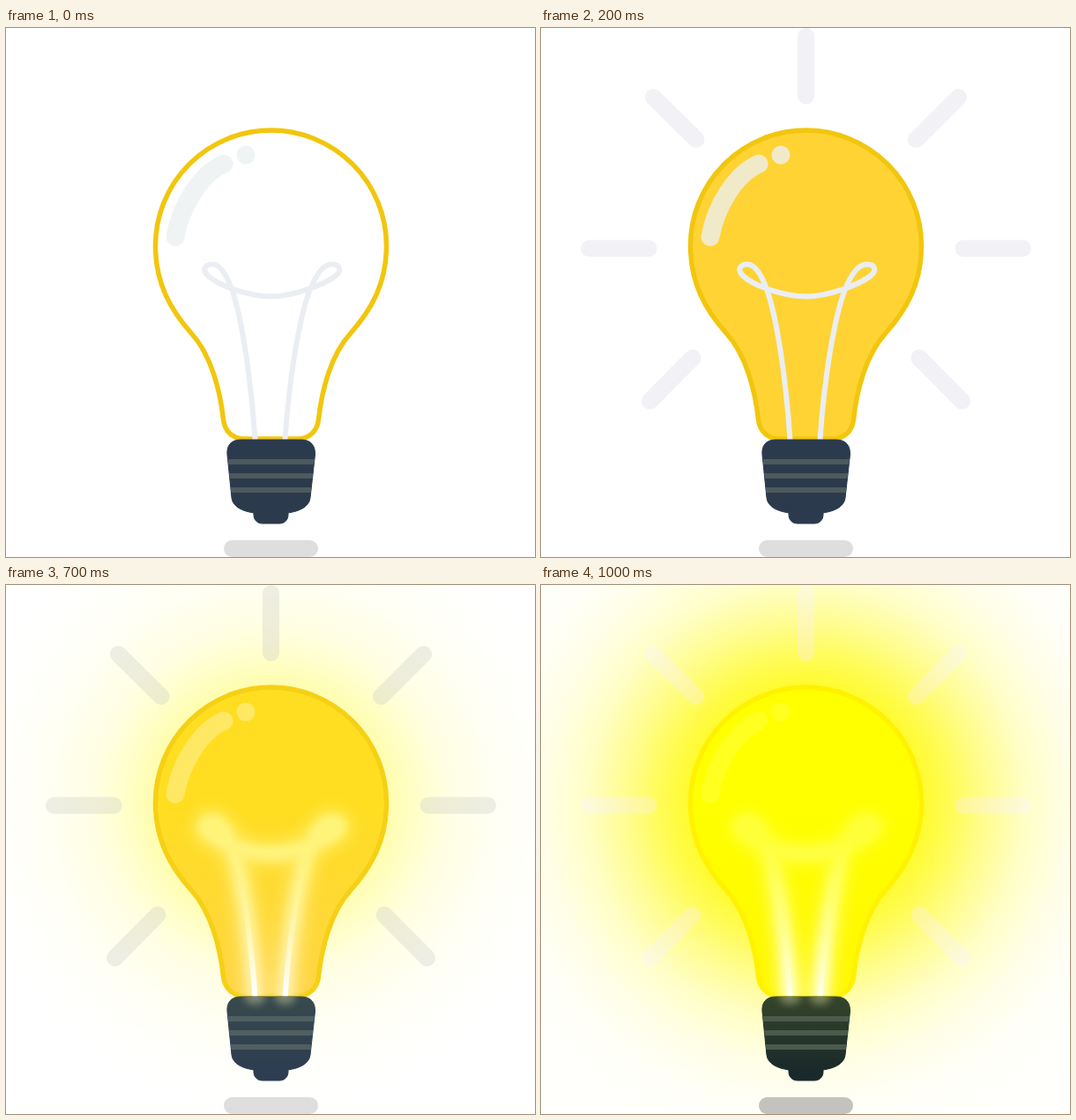
Write an HTML page that moves like this. It is 600 by 600 pixels and loops after 1.2 s.

```html
<!DOCTYPE html>
<html lang="en">
<head>
<meta charset="utf-8">
<title>Light bulb</title>
<style>
  html, body { margin: 0; width: 100%; height: 100%; overflow: hidden; background: #fff; }
  svg { display: block; width: 100%; height: 100%; }
  .line { fill: none; stroke-linecap: round; }
  #rays { stroke: url(#rayFill); stroke-width: 19; opacity: var(--rayAlpha); }
  #glass { fill: url(#bulbFill); fill-opacity: var(--bulbAlpha); stroke: var(--edge); stroke-width: 5.5; }
  #shine { stroke: var(--shine); stroke-width: 21; }
  #wire { stroke: url(#wireFill); stroke-width: 6; stroke-linecap: butt; }
  #halo { opacity: var(--haloAlpha); stroke: url(#haloFill); }
  #halo use:first-child { stroke-width: 26; opacity: .7; }
  #halo use:last-child { stroke-width: 14; }
  #base { fill: url(#baseFill); stroke: url(#baseFill); stroke-width: 1; }
  #feet { fill: #fff8c0; opacity: var(--footAlpha); }
</style>
</head>
<body>
<svg viewBox="0 0 600 600">
  <defs>
    <radialGradient id="glowFill" gradientUnits="userSpaceOnUse" cx="300.5" cy="247" r="400"></radialGradient>
    <radialGradient id="rayFill" gradientUnits="userSpaceOnUse" cx="300.5" cy="250" r="256">
      <stop offset=".66" stop-color="var(--rayInner)"/><stop offset="1" stop-color="var(--rayOuter)"/>
    </radialGradient>
    <linearGradient id="bulbFill" gradientUnits="userSpaceOnUse" x1="0" y1="250" x2="0" y2="466">
      <stop stop-color="var(--bulbTop)"/><stop offset="1" stop-color="var(--bulbLow)"/>
    </linearGradient>
    <linearGradient id="wireFill" gradientUnits="userSpaceOnUse" x1="0" y1="310" x2="0" y2="462">
      <stop stop-color="var(--wireTop)"/><stop offset="1" stop-color="var(--wireLow)"/>
    </linearGradient>
    <linearGradient id="haloFill" gradientUnits="userSpaceOnUse" x1="0" y1="290" x2="0" y2="450">
      <stop stop-color="var(--haloTop)"/><stop offset="1" stop-color="var(--haloLow)"/>
    </linearGradient>
    <linearGradient id="baseFill" gradientUnits="userSpaceOnUse" x1="0" y1="467" x2="0" y2="550">
      <stop stop-color="var(--baseTop)"/><stop offset="1" stop-color="var(--baseLow)"/>
    </linearGradient>
    <filter id="soft" filterUnits="userSpaceOnUse" x="150" y="200" width="300" height="320"><feGaussianBlur stdDeviation="9"/></filter>
    <filter id="crisp" filterUnits="userSpaceOnUse" x="150" y="200" width="300" height="320"><feGaussianBlur stdDeviation="4"/></filter>
    <path id="bulbShape" d="M169.5 247A131 131 0 0 1 431.5 247C431.5 290 414 320 391 346C368 371 358 412 354.5 444C353 458 343 466 331 466H270C258 466 248 458 246.5 444C243 412 233 371 210 346C187 320 169.5 290 169.5 247Z"/>
    <path id="wireShape" d="M282.5 467C278 400 268 330 256 296C250 280 243 268 234 268C226 268 222 274 229 281C242 293 275 304 301 304.5C327 304 361 291 374 281C381 275 379 268 370 268C359 268 352 280 345 296C332 330 321 400 316.5 467"/>
    <path id="baseShape" d="M266 467H335C346 467 351 474 350.5 484L345 533C344 543 333 548 320 550V552C320 558 316 562 310 562H291C285 562 281 558 281 552V550C268 548 257 543 256 533L251 484C250 474 255 467 266 467Z"/>
    <clipPath id="inBulb"><use href="#bulbShape"/></clipPath>
    <clipPath id="inBase"><use href="#baseShape"/></clipPath>
  </defs>

  <rect width="600" height="600" fill="url(#glowFill)"/>
  <path id="rays" class="line" d="M300.5 9.5V77M127.5 78.5L176 126.5M473.5 78.5L425.5 126.5M54.5 250H122M479 250H546.5M123.5 423L172 374M477.5 423L429 374"/>
  <rect x="247" y="581" width="107" height="19" rx="9.5" fill="var(--shadow)"/>

  <use id="glass" href="#bulbShape"/>
  <path id="shine" class="line" d="M192 237C198 203 220 166 247 154M272 144h.01"/>
  <g id="halo" class="line" clip-path="url(#inBulb)">
    <use href="#wireShape" filter="url(#soft)"/>
    <use href="#wireShape" filter="url(#crisp)"/>
  </g>
  <use id="wire" class="line" href="#wireShape"/>

  <use id="base" href="#baseShape"/>
  <path clip-path="url(#inBase)" fill="var(--stripe)" d="M245 489h112v6h-112zM245 505h112v6h-112zM245 521h112v6h-112z"/>
  <g id="feet" clip-path="url(#inBase)">
    <ellipse cx="282.5" cy="467" rx="12" ry="9" filter="url(#crisp)"/>
    <ellipse cx="316.5" cy="467" rx="12" ry="9" filter="url(#crisp)"/>
  </g>
</svg>
<script>
const LOOP = 1200;
const GLOW_RADII = [130, 165, 200, 250, 300, 350, 400];
const svg = document.querySelector('svg');
const glowFill = document.getElementById('glowFill');

// Each step lists only what changes from the one before.
const changes = [
  { at: 0, glow: [0, 0, 0, 0, 0, 0, 0],
    rayInner: '#f1f1f6', rayOuter: '#f1f1f6', rayAlpha: 0, shadow: '#dedede',
    bulbTop: '#ffd333', bulbLow: '#ffd333', bulbAlpha: 0, edge: '#f2c60d', shine: '#eff3f4',
    wireTop: '#eaeef3', wireLow: '#eaeef3', haloTop: '#fff0a0', haloLow: '#fff0a0', haloAlpha: 0,
    baseTop: '#2c3a4d', baseLow: '#2c3a4d', stripe: '#4d5a5d', footAlpha: 0 },
  { at: 100, rayAlpha: .5, bulbAlpha: .5, shine: '#f0efde' },
  { at: 200, rayAlpha: 1, bulbAlpha: 1, shine: '#f0eac9' },
  { at: 300, haloAlpha: .3, footAlpha: .1, wireTop: '#f1f4f7', wireLow: '#f1f4f7', baseTop: '#2f3e4d' },
  { at: 400, haloAlpha: .6, footAlpha: .2, wireTop: '#f8fafa', wireLow: '#f8fafa', baseTop: '#32424d' },
  { at: 500, haloAlpha: .85, footAlpha: .3, wireTop: '#fffffb', wireLow: '#fffffb',
    baseTop: '#35474c', bulbLow: '#ffd83c' },
  { at: 700, glow: [.33, .21, .11, .05, .015, 0, 0],
    rayInner: '#dcdcc8', rayOuter: '#dcdcd6', rayAlpha: .5,
    bulbTop: '#ffde22', bulbLow: '#ffd544', edge: '#f6d015', shine: '#ffe864',
    wireTop: '#fff88800', wireLow: '#ffffff', haloTop: '#fff684', haloLow: '#fff3b8', haloAlpha: .9,
    baseTop: '#384a4c', baseLow: '#2d3d52', stripe: '#505f60', footAlpha: .35 },
  { at: 800, glow: [.58, .41, .25, .11, .04, .01, 0],
    rayInner: '#ebe5b4', rayOuter: '#e2e2d0',
    bulbTop: '#ffec0c', bulbLow: '#ffdc30', edge: '#fde005', shine: '#ffef40',
    wireTop: '#fff85000', wireLow: '#fffbd8c0', haloTop: '#fff850', haloLow: '#fff6b0',
    baseTop: '#465430', baseLow: '#2d4350', stripe: '#5d6a5c' },
  { at: 1000, glow: [.83, .66, .46, .22, .09, .03, .01], shadow: '#c3c3be',
    rayInner: '#fff4a8', rayOuter: '#faf8ee', rayAlpha: .65,
    bulbTop: '#ffff00', bulbLow: '#fff700', edge: '#fff200', shine: '#ffff20',
    wireTop: '#ffff2000', wireLow: '#fffff0c0', haloTop: '#ffff40', haloLow: '#ffffd8',
    baseTop: '#35452a', baseLow: '#1a292a', stripe: '#4b5a4c' }
];

let last = {};
const steps = changes.map(change => (last = { ...last, ...change }));

const glowStops = GLOW_RADII.map(radius => {
  const stop = document.createElementNS('http://www.w3.org/2000/svg', 'stop');
  stop.setAttribute('offset', radius / 400);
  stop.setAttribute('stop-color', '#fffa00');
  return glowFill.appendChild(stop);
});

let shown;
function show(step) {
  if (step === shown) return;
  shown = step;
  const { at, glow, ...look } = step;
  glowStops.forEach((stop, i) => stop.setAttribute('stop-opacity', glow[i]));
  for (const [name, value] of Object.entries(look)) svg.style.setProperty('--' + name, value);
}

function tick() {
  const time = performance.now() % LOOP;
  show(steps.findLast(step => step.at <= time));
  requestAnimationFrame(tick);
}
tick();
</script>
</body>
</html>
```
